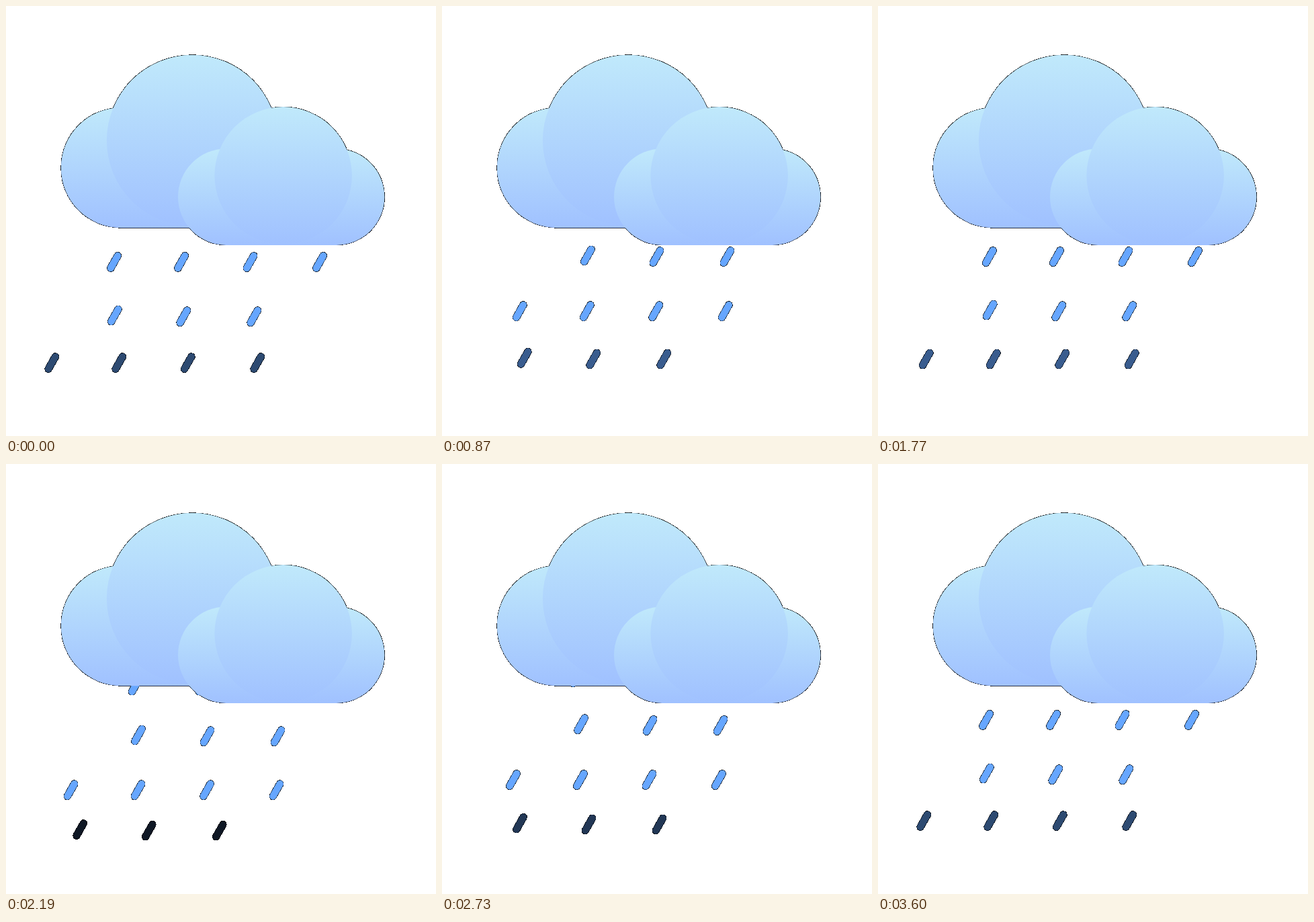
An HTML page with a canvas for the animation above (3.63 s loop, 640x640 px).

```html
<!DOCTYPE html>
<html lang="en">
<head>
<meta charset="utf-8">
<title>Rain clouds</title>
<style>
  html, body { margin: 0; width: 100%; height: 100%; overflow: hidden; background: #fff; }
  canvas { display: block; }
</style>
</head>
<body>
<canvas width="640" height="640"></canvas>
<script>
const SIZE = 640, STEP = 30, LOOP = 3630, PERIOD = 600;
const FADE_START = 385, FADE_END = 785;
const ctx = document.querySelector('canvas').getContext('2d', { willReadFrequently: true });
ctx.lineCap = 'round';
ctx.lineWidth = 10.4;

// Each row of drops: start delay, x at y = 381, and [dx, dy] per drop.
const rows = [
  { delay: 0, x: 161, drops: [[0, 0], [100, 0], [202.5, 0], [306, 0]] },
  { delay: 300, x: 314.5, drops: [[-102.5, -1.7], [0, 0], [105, 0]] }
];

function fallY(age) {
  const u = (age - 200) / 100;
  return 435.3 + 27.3 * u - 0.24 * u * u - 0.15 * u ** 3;
}

function opacity(age) {
  const u = Math.min(1, Math.max(0, (FADE_END - age) / (FADE_END - FADE_START)));
  return u * u * (3 - 2 * u);
}

function drawRow({ x, drops }, age) {
  const y = fallY(age), left = x - 0.618 * (y - 381);
  ctx.globalAlpha = opacity(age);
  ctx.strokeStyle = '#66a6ff';
  for (const [dx, dy] of drops) {
    ctx.beginPath();
    ctx.moveTo(left + dx - 5.2, y + dy + 9.2);
    ctx.lineTo(left + dx + 5.2, y + dy - 9.2);
    ctx.stroke();
  }
  ctx.globalAlpha = 1;
}

function pill(left, top, right, bottom) {
  const fill = ctx.createLinearGradient(0, top, 0, bottom);
  fill.addColorStop(0, '#c0e9fb');
  fill.addColorStop(1, '#a0c1ff');
  ctx.fillStyle = fill;
  ctx.beginPath();
  ctx.roundRect(left, top, right - left, bottom - top, (bottom - top) / 2);
  ctx.fill();
}

// Soft edges turn opaque over black, giving the thin dark outline.
function hardenEdges() {
  const image = ctx.getImageData(0, 0, SIZE, SIZE), px = image.data;
  for (let i = 0; i < px.length; i += 4) {
    const a = px[i + 3];
    if (!a || a === 255) continue;
    for (let c = 0; c < 3; c++) px[i + c] *= a / 255;
    px[i + 3] = 255;
  }
  ctx.putImageData(image, 0, 0);
}

function draw(time) {
  ctx.clearRect(0, 0, SIZE, SIZE);
  for (const row of rows) {
    const phase = (time - row.delay + PERIOD) % PERIOD;
    for (let age = phase - PERIOD; age < FADE_END; age += PERIOD)
      if (age > -300) drawRow(row, age);
  }
  pill(81.8, 151.2, 380, 330.2);
  pill(149.9, 72.8, 404.6, 327.5);
  pill(256, 212.4, 563.4, 355.9);
  pill(310.4, 150.1, 514.9, 354.6);
  hardenEdges();
}

const start = performance.now();
let shown = -1;
function tick() {
  const time = Math.floor((performance.now() - start) % LOOP / STEP) * STEP;
  if (time !== shown) draw(shown = time);
  requestAnimationFrame(tick);
}
tick();
</script>
</body>
</html>
```
